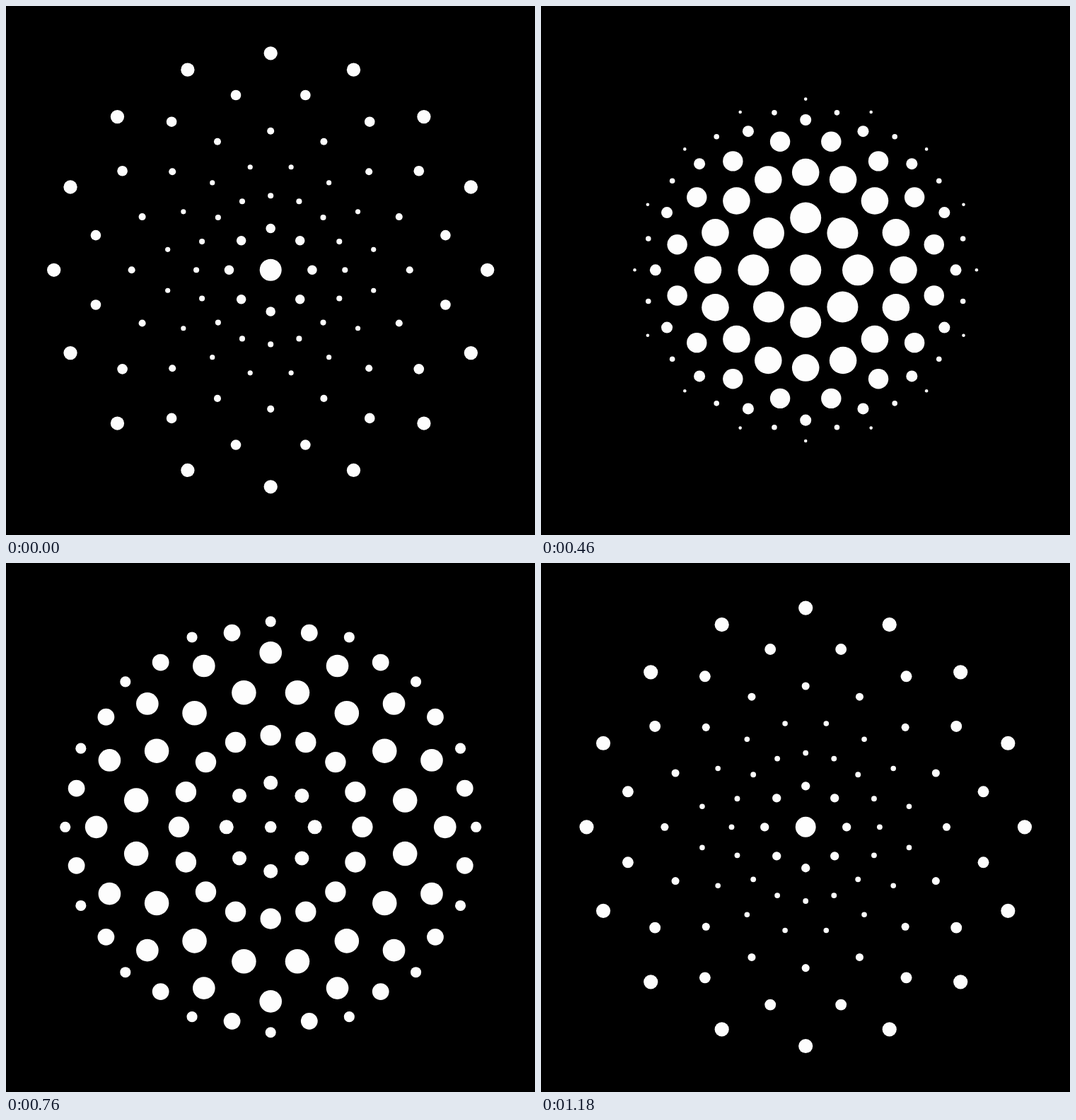
Write an HTML page that moves like this. It is 748 by 748 pixels and loops after 1200 ms.

```html
<!DOCTYPE html>
<html lang="en">
<head>
<meta charset="utf-8">
<title>Pulsing dots</title>
<style>
  html, body { margin: 0; width: 100%; height: 100%; overflow: hidden; background: #000; }
  svg { display: block; width: 100vw; height: 100vh; }
</style>
</head>
<body>
<svg viewBox="0 0 748 748"><g id="dots" fill="#fdfdfd"></g></svg>
<script>
const LOOP = 1200, HALF = LOOP / 2, STEP = 20;
const CX = 374.2, CY = 373.3;

// near/far: ring radius at rest and at peak; thin/fat: dot radius relative to the ring
const rings = [
  { count: 8,  turn: 0,   peak: 420,  from: [55.2, 0.0725],  to: [74, 0.3] },
  { count: 16, turn: 0,   peak: 540,  from: [104.4, 0.0364], to: [139.5, 0.1434] },
  { count: 16, turn: 0.5, peak: 660,  from: [147.4, 0.0228], to: [196.5, 0.0931] },
  { count: 16, turn: 0.5 - 0.5, peak: 780, from: [185, 0.0167], to: [246.7, 0.0643] },
  { count: 16, turn: 0.5, peak: 900,  from: [216.2, 0.0116], to: [288, 0.0464] },
  { count: 16, turn: 0,   peak: 1020, from: [241, 0.0092],   to: [321.6, 0.0366] }
];
const core = { peak: 300, from: 6.2, to: 24.8 };

const mix = (a, b, k) => a + (b - a) * k;

// cubic-bezier(.42, 0, .58, 1)
function ease(x) {
  let lo = 0, hi = 1, u = x;
  for (let i = 0; i < 24; i++) {
    const v = 1 - u;
    const bx = 1.26 * u * v * v + 1.74 * u * u * v + u * u * u;
    if (bx < x) lo = u; else hi = u;
    u = (lo + hi) / 2;
  }
  return u * u * (3 - 2 * u);
}

// 1 at the peak, 0 half a loop away
function swell(t, peak) {
  const gap = (t - peak + 2 * LOOP) % LOOP;
  return 1 - ease(Math.min(gap, LOOP - gap) / HALF);
}

const layer = document.getElementById("dots");
function addDot() {
  const dot = document.createElementNS("http://www.w3.org/2000/svg", "circle");
  layer.appendChild(dot);
  return dot;
}
function place(dot, x, y, r) {
  dot.setAttribute("cx", x.toFixed(3));
  dot.setAttribute("cy", y.toFixed(3));
  dot.setAttribute("r", r.toFixed(3));
}

const centre = addDot();
for (const ring of rings) ring.dots = Array.from({ length: ring.count }, addDot);

function draw(t) {
  place(centre, CX, CY, mix(core.from, core.to, swell(t, core.peak)));
  for (const { count, turn, peak, from, to, dots } of rings) {
    const k = swell(t, peak);
    const d = mix(from[0], to[0], k);
    const r = d * mix(from[1], to[1], k);
    dots.forEach((dot, i) => {
      const a = (i + turn) / count * 2 * Math.PI;
      place(dot, CX + d * Math.sin(a), CY - d * Math.cos(a), r);
    });
  }
}

function tick() {
  const t = performance.now() % LOOP;
  draw(Math.floor(t / STEP) * STEP);
  requestAnimationFrame(tick);
}
draw(0);
requestAnimationFrame(tick);
</script>
</body>
</html>
```
